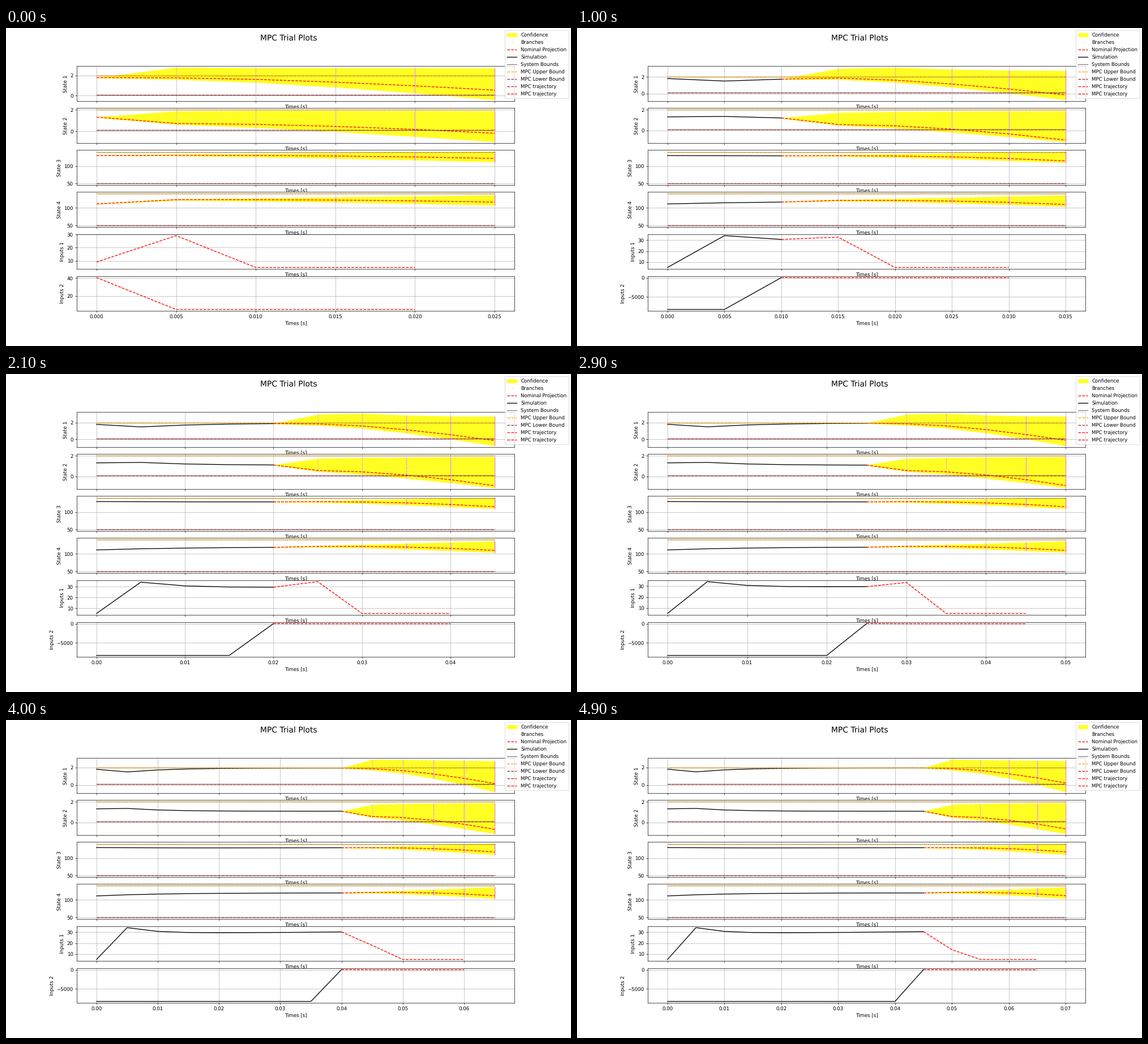
A matplotlib script for the animation above (5 s loop, 998 by 561 pixels).

```python
import matplotlib.pyplot as plt
import numpy as np
from matplotlib.animation import FuncAnimation

plt.rcParams["font.family"] = "DejaVu Sans"
plt.rcParams["text.hinting"] = "none"

WIDTH, HEIGHT = 998, 561
DPI = WIDTH / 16
DT, HORIZON = 0.005, 5
SOLVES_PER_STEP, STEPS = 5, 10
AHEAD = np.linspace(0, 1, HORIZON)

# Each curve is (start, drop, power) along the horizon.
# "cold" is the first solve's start offset and lower-edge drop factor.
MODELS = [
    dict(bounds=(0.1, 2), overshoot=0.3, cold=(-0.08, 0.83),
         nominal=(1.86, 2.05, 1.5), upper=(2.87, 0.14, 0.7),
         lower=(1.72, 2.45, 1.4)),
    dict(bounds=(0.1, 2), overshoot=0, cold=(0.15, 1.02),
         nominal=(0.57, 1.52, 1.75), upper=(1.7, -0.17, 0.5),
         lower=(0.5, 1.58, 1.25)),
    dict(bounds=(50, 140), overshoot=0, cold=(1.2, 0.95),
         nominal=(129.6, 15, 2.1), upper=(131, -10, 1),
         lower=(128.2, 18, 1.3)),
    dict(bounds=(50, 140), overshoot=0, cold=(2, 0.9),
         nominal=(121.2, 12, 2.5), upper=(122, -13.5, 1),
         lower=(119.3, 15, 1.5)),
]


def simulate():
    """Four states and the first input, each settling after a start-up jump."""
    k = np.arange(STEPS)
    states = [1.95 - 0.45 * 0.5 ** (k - 1.0),
              1.08 + 0.27 * 0.45 ** (k - 1.0),
              128.3 + 1.7 * 0.6 ** k + 0.13 * k,
              119.5 - 8.5 * 0.62 ** k]
    states[0][0], states[1][0] = 1.8, 1.31
    first_input = 28.3 + 5.7 * 0.35 ** (k - 1.0) + 0.25 * k
    first_input[0] = 5
    return states, first_input, np.full(STEPS, -8360)


STATES, INPUT_1, INPUT_2 = simulate()


def fall(curve, factor=1):
    start, drop, power = curve
    return start - factor * drop * AHEAD ** power


def predict(model, now, step):
    """Nominal path and confidence edges, starting at the current state."""
    cold = max(0, 1 - step)
    hard = np.interp(step, [0, 1, 5.4, 8.5], [0, 1, 0.8, 0])
    shift, lower_factor = model["cold"]
    shift *= cold
    bump = model["overshoot"] * hard * np.exp(-(4 * AHEAD - 1) ** 2)

    nominal = fall(model["nominal"], 0.79 + 0.21 * hard - 0.19 * cold) + shift
    upper = fall(model["upper"]) + bump + shift * (1 - AHEAD)
    lower = fall(model["lower"], 1 + cold * (lower_factor - 1)) + shift
    return [np.r_[now, path] for path in (nominal, upper, lower)]


def fit_y(ax, *series):
    values = np.concatenate(series)
    margin = 0.05 * np.ptp(values)
    ax.set_ylim(values.min() - margin, values.max() + margin)


def make_state(ax, labelled, limits):
    def tag(text):
        return text if labelled else None

    band = ax.fill_between([0, 1], 0, 1, color="yellow", alpha=0.86,
                           label=tag("Confidence"))
    dots = ax.scatter([0], [0], s=1, color="#f0b4c8", label=tag("Branches"))
    plan, = ax.plot([], [], "--", color="red", label=tag("Nominal Projection"))
    past, = ax.plot([], [], color="black", label=tag("Simulation"))
    low, high = limits
    styles = [(low, "gray", "-", "System Bounds"), (high, "gray", "-", None),
              (high, "orange", "--", "MPC Upper Bound"),
              (low, "brown", "--", "MPC Lower Bound")]
    bounds = [ax.plot([0, 1], [y, y], style, color=color, label=tag(text))[0]
              for y, color, style, text in styles]
    return band, dots, plan, past, bounds


def make_input(ax):
    past, = ax.plot([], [], color="black")
    plan, = ax.plot([], [], "--", color="red", label="MPC trajectory")
    return past, plan


fig, axes = plt.subplots(6, 1, sharex=True, dpi=DPI,
                         figsize=(WIDTH / DPI, HEIGHT / DPI))
fig.suptitle("MPC Trial Plots", fontsize=16)
state_axes, input_axes = axes[:4], axes[4:]
state_art = [make_state(ax, ax is axes[0], model["bounds"])
             for ax, model in zip(state_axes, MODELS)]
input_art = [make_input(ax) for ax in input_axes]
for i, ax in enumerate(axes):
    ax.set_ylabel(f"State {i + 1}" if i < 4 else f"Inputs {i - 3}")
    ax.set_xlabel("Times [s]")
    ax.set_axisbelow(True)
    ax.grid(True)
fig.legend()


def branch_points(times, upper, lower):
    """Columns of branch ends whose number doubles with every step ahead."""
    columns = []
    for j in range(1, HORIZON + 1):
        spread = np.linspace(lower[j], upper[j], 4 * 2 ** j)
        columns.append(np.c_[np.full_like(spread, times[j]), spread])
    return np.concatenate(columns)


def update_state(ax, art, model, history, step, past_t, plan_t):
    band, dots, plan, past, bounds = art
    nominal, upper, lower = predict(model, history[-1], step)
    band.set_verts([np.r_[np.c_[plan_t, upper], np.c_[plan_t, lower][::-1]]])
    dots.set_offsets(branch_points(plan_t, upper, lower))
    plan.set_data(plan_t, nominal)
    past.set_data(past_t, history)
    for line in bounds:
        line.set_xdata([0, plan_t[-1]])
    fit_y(ax, upper, lower, nominal, history, model["bounds"])


def update(frame):
    k, solve = divmod(frame, SOLVES_PER_STEP)
    step = k + 0.1 * solve
    past_t = DT * np.arange(k + 1)
    plan_t = DT * np.arange(k, k + HORIZON + 1)
    end = plan_t[-1]
    axes[0].set_xlim(-0.05 * end, 1.05 * end)

    for ax, art, model, states in zip(state_axes, state_art, MODELS, STATES):
        update_state(ax, art, model, states[:k + 1], step, past_t, plan_t)

    first = INPUT_1[k] if k else 9.1
    second = np.interp(step, [0, 1.1, 3, 5.4, 8, 9.4],
                       [29, 30.3, 35.8, 33.5, 18, 14])
    plans = [[first, second, 5, 5, 5], [40.5, 5, 5, 5, 5]]
    for ax, (past, plan), moves, done in zip(input_axes, input_art, plans,
                                             (INPUT_1, INPUT_2)):
        applied = np.r_[done[:k], moves[0]]
        past.set_data(past_t, applied)
        plan.set_data(plan_t[:-1], moves)
        fit_y(ax, applied, moves)
    return []


anim = FuncAnimation(fig, update, frames=STEPS * SOLVES_PER_STEP,
                     interval=100, repeat=True, repeat_delay=0)
plt.show()
```
